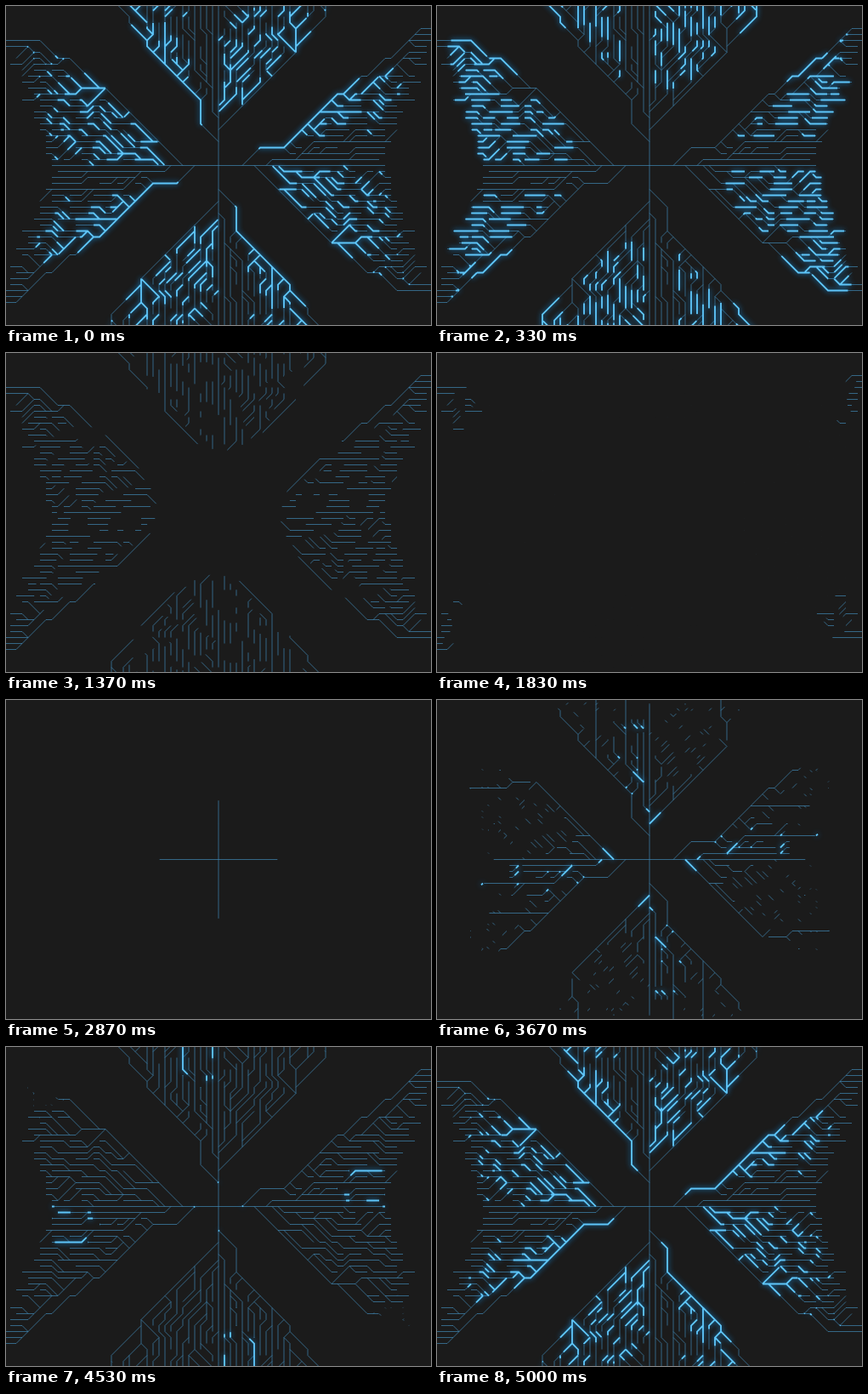
Recreate the animation shown at these times as an HTML page with a canvas. Size 500x375 px, loop 5030 ms.

```html
<!DOCTYPE html>
<html>
<head>
<meta charset="utf-8">
<style>
html, body { margin: 0; width: 100%; height: 100%; overflow: hidden; background: #1b1b1b; }
canvas { display: block; }
</style>
</head>
<body>
<canvas id="stage" width="500" height="375"></canvas>
<script>
const ctx = document.getElementById('stage').getContext('2d');
const LOOP = 5030, CELL = 7;

let seed = 29;
const rand = () => (seed = (seed * 16807) % 2147483647) / 2147483647;
const clamp = x => Math.min(1, Math.max(0, x));
const cubic = x => (x = clamp(x)) < .5 ? 4 * x ** 3 : 1 - 4 * (1 - x) ** 3;
const quad = x => (x = clamp(x)) < .5 ? 2 * x * x : 1 - 2 * (1 - x) ** 2;

// One arm on a grid: u runs outward, v sideways.
const paths = [], queue = [], nodes = new Set(), crossings = new Set();
const low = Array(40).fill(0), high = Array(40).fill(0);
const key = (u, v) => u + ',' + v;

function occupy(u, v, end) {
  nodes.add(key(u, v));
  queue.push({ u, v, end });
}

// moves: rows to climb, column to run to, and so on in pairs
function addPath(group, [u, v, ...moves], options = {}) {
  const points = [[u, v]];
  const start = [u, v];
  occupy(u, v);
  for (let i = 0; i < moves.length; i += 2) {
    const side = Math.sign(moves[i]);
    for (let n = Math.abs(moves[i]); n > 0; n--) {
      crossings.add(key(u + .5, v + side / 2));
      occupy(++u, v += side);
    }
    points.push([u, v]);
    while (u < moves[i + 1]) occupy(++u, v);
    points.push([u, v]);
  }
  queue[queue.length - 1].end = true;
  const lengths = points.map((p, i) => i ? Math.hypot(p[0] - points[i - 1][0], p[1] - points[i - 1][1]) : 0);
  paths.push({ points, lengths, total: lengths.reduce((a, b) => a + b), ...timing(group, ...start), ...options });
}

function timing(group, u, v) {
  const jitter = rand();
  if (group === 'trunk') return { draw: 2460, span: 900, erase: 900, pulse: null };
  if (group === 'inner') return { draw: 2650 + 30 * u, span: 850, erase: 920, pulse: 3480 + jitter * 60 };
  if (group === 'corner') return v > 0
    ? { draw: 4400, span: 600, erase: 1400 + jitter * 40, pulse: 4900 + jitter * 80 }
    : { draw: 3700, span: 700, erase: 1350 + jitter * 40, pulse: 5150 + jitter * 60 };
  return { draw: 3050 + 14 * u, span: 900, erase: 980 + jitter * 50, pulse: 4440 + 10 * u + jitter * 90 };
}

addPath('trunk', [0, 0, 0, 26]);
addPath('inner', [26, 0, 0, 28], { pulse: 3700 });
addPath('inner', [6, 0, 13, 19], { pulse: 3480 });
addPath('middle', [4, 0, -3, 11, -6, 27], { draw: 2850, pulse: 4490 });
addPath('middle', [17, -9, -3, 21, -3, 25, -3, 29], { draw: 3150 });
addPath('corner', [29, -18, -5, 36]);
addPath('corner', [32, -21, 0, 36]);
addPath('corner', [33, -22, 0, 36]);
addPath('middle', [19, 13, 0, 20, 5, 27], { draw: 3750 });
addPath('corner', [27, 18, 3, 36]);

for (const { u, v } of queue) {
  low[u] = Math.min(low[u], v);
  high[u] = Math.max(high[u], v);
}

addPath('inner', [8, 0, -1, 13], { pulse: 3480 });
addPath('inner', [13, -1, -3, 29], { pulse: 3480 });
addPath('inner', [14, -2, 0, 22], { pulse: 3640 });
addPath('inner', [22, -2, -1, 28], { pulse: 3480 });
addPath('inner', [13, -1, 0, 22], { pulse: 3600 });
addPath('inner', [22, -1, 0, 27], { pulse: 3800 });
addPath('inner', [21, -4, -2, 28], { pulse: 3950 });
addPath('middle', [20, 13, 0, 23, -1, 31], { draw: 3000 });

const limit = v => Math.min(36, Math.floor(28 + Math.abs(v) * .37 + (Math.abs(v) % 3 === 2 ? 1 : 0)));
const free = (u, v) => u <= limit(v) && v > low[u] && v < high[u] && !nodes.has(key(u, v));

function climbFits(u, v, rows) {
  const side = Math.sign(rows);
  for (let n = Math.abs(rows); n > 0; n--) {
    if (crossings.has(key(u + .5, v + side / 2))) return false;
    if (!free(++u, v += side)) return false;
  }
  return true;
}

// Slanted branches come first; going straight on is the last resort.
function sprout({ u, v, end }) {
  if (u < 9 || !end && rand() > .42) return;
  const options = [1, -1, 2, -2, 3, -3].map(rows => [rand() - Math.abs(rows) * .1, rows])
    .sort((a, b) => a[0] - b[0]).map(option => option[1]);
  if (rand() < (end ? .4 : .15)) options.push(0);
  for (const rows of options) {
    if (!climbFits(u, v, rows)) continue;
    const row = v + rows;
    let to = u + Math.abs(rows);
    for (let n = 1 + Math.floor(rand() * 5); n > 0 && free(to + 1, row); n--) to++;
    if (to - u < 2) continue;
    const group = u + Math.abs(v) > 43 ? 'corner' : v < 0 && v > -6 ? 'inner' : 'middle';
    addPath(group, [u, v, rows, to]);
    return;
  }
}

// Grow side branches from the centre outward.
while (queue.length) {
  let next = 0;
  queue.forEach((node, i) => { if (node.u < queue[next].u) next = i; });
  sprout(queue.splice(next, 1)[0]);
}

function trace({ points, lengths, total }, from, to) {
  let at = 0, open = false;
  from *= total;
  to *= total;
  for (let i = 1; i < points.length; i++) {
    const len = lengths[i], [x, y] = points[i - 1], [x2, y2] = points[i];
    const a = Math.max(from - at, 0), b = Math.min(to - at, len);
    if (len && b > a) {
      const place = d => [(x + (x2 - x) * d / len) * CELL, (y + (y2 - y) * d / len) * CELL];
      if (!open) ctx.moveTo(...place(a));
      ctx.lineTo(...place(b));
      open = true;
    }
    at += len;
  }
}

function strokeAll(range) {
  ctx.beginPath();
  const parts = paths.map(p => [p, range(p)]).filter(([, r]) => r && r[1] > r[0]);
  for (let arm = 0; arm < 4; arm++) {
    ctx.setTransform(1, 0, 0, 1, 250, 187.5);
    ctx.rotate(arm * Math.PI / 2);
    for (const [p, [a, b]] of parts) trace(p, a, b);
  }
  ctx.setTransform(1, 0, 0, 1, 0, 0);
  ctx.stroke();
}

function lineRange(p, t) {
  return t < 2350 ? [cubic((t - p.erase) / 860), 1] : [0, cubic((t - p.draw) / p.span)];
}

function pulseRange(p, t) {
  if (p.pulse === null) return null;
  const time = t < p.pulse ? t + LOOP : t;
  const x = (time - p.pulse) / 1060;
  return x > 1 ? null : [quad((x - .33) * 1.5), quad(x * 1.5)];
}

function frame(now) {
  const t = now % LOOP;
  ctx.shadowBlur = 0;
  ctx.fillStyle = '#1b1b1b';
  ctx.fillRect(0, 0, 500, 375);
  ctx.lineWidth = 1;
  ctx.strokeStyle = 'rgba(70, 150, 200, .62)';
  strokeAll(p => lineRange(p, t));
  ctx.lineWidth = 1.8;
  ctx.strokeStyle = '#5fc6fa';
  ctx.shadowColor = '#1592e6';
  ctx.shadowBlur = 6;
  strokeAll(p => pulseRange(p, t));
  requestAnimationFrame(frame);
}
requestAnimationFrame(frame);
</script>
</body>
</html>
```
